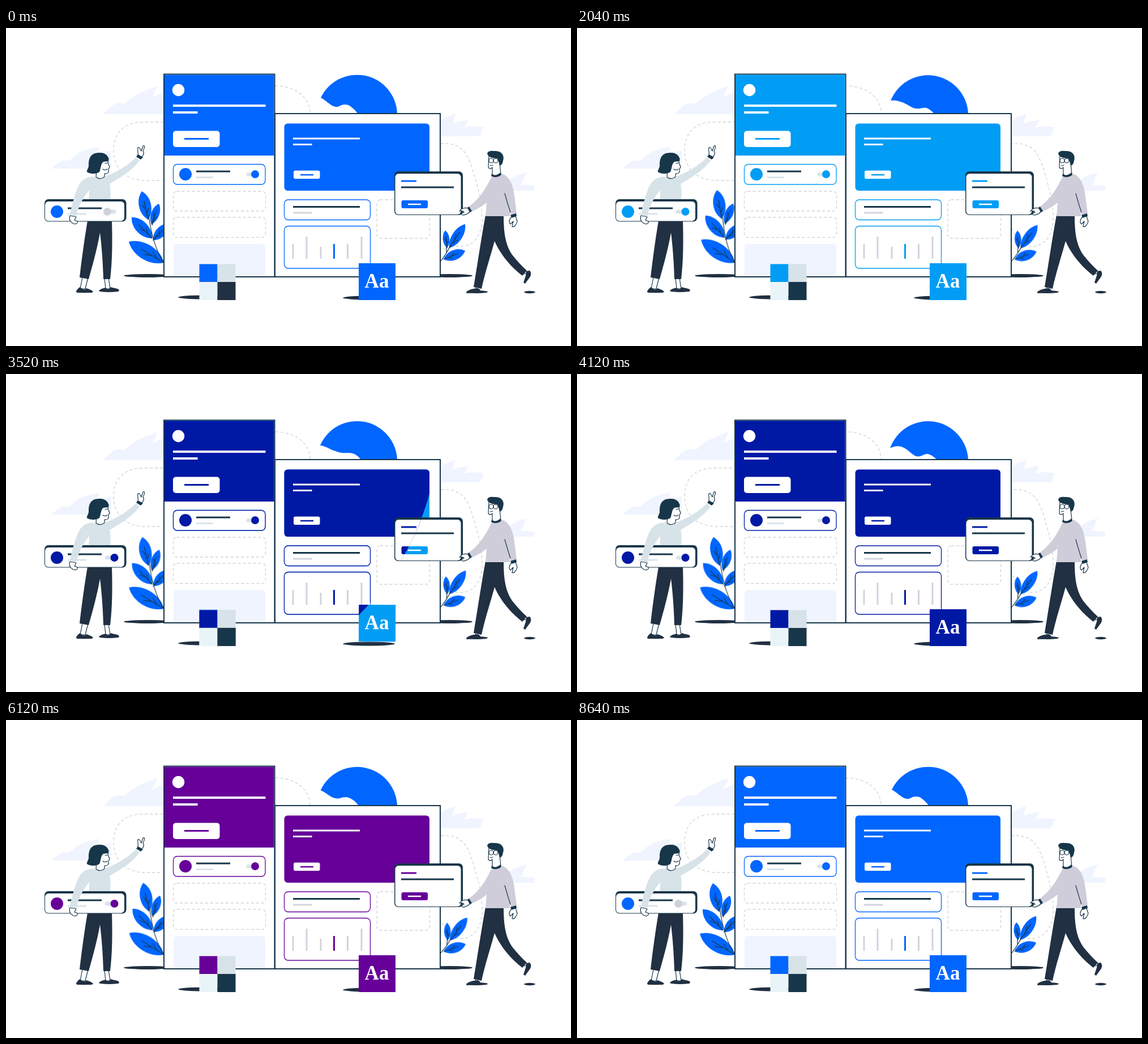
Animation of 998 by 561 pixels, one loop 8.68 s. Source, as an HTML page:

```html
<!DOCTYPE html>
<html lang="en">
<head>
<meta charset="utf-8">
<title>Interface themes</title>
<style>
html, body { margin: 0; width: 100%; height: 100%; overflow: hidden; background: #fff; }
svg { display: block; width: 100vw; height: 100vh; }
.ink { fill: #17364a; }
.slate { fill: #213042; }
.cloud, .panel { fill: #f0f4ff; }
.line { fill: none; stroke: #17364a; stroke-width: 1.2; stroke-linecap: round; stroke-linejoin: round; }
.skin { fill: #fff; stroke: #17364a; stroke-width: 1.2; stroke-linejoin: round; }
.box { fill: #fff; stroke: #17364a; stroke-width: 2; }
.dash { fill: none; stroke: #d2d2da; stroke-width: 1.3; stroke-dasharray: 5 4; }
.trail { stroke: #ccd6d4; animation: march 8.68s linear infinite; }
.blue { fill: #06f; }
.tint { fill: currentColor; }
.edge { fill: #fff; stroke: currentColor; stroke-width: 1.3; }
.plant { animation: 8.68s ease-in-out infinite; }
.left { transform-origin: 279px 414px; animation-name: swayLeft; }
.right { transform-origin: 768px 411px; animation-name: swayRight; }
.sun { animation: swell 2893.33ms ease-in-out infinite; }
.avatar { animation: recolor 8.68s linear infinite; }
.knob { animation: slide 8.68s ease-in-out infinite, light 8.68s linear infinite; }
.dots { opacity: 0; animation: pop 8.68s linear infinite; }
.palette { transform-origin: 405px 480px; animation: hopPalette 8.68s ease-in-out infinite; }
.type { transform-origin: 688px 480px; animation: hopType 8.68s ease-in-out infinite; }
.aa { font: bold 35px "Liberation Serif", "Noto Serif", serif; fill: #fff; text-anchor: middle; }
@keyframes march { to { stroke-dashoffset: -180px; } }
@keyframes swayLeft {
  0%, 100% { transform: rotate(0); }
  17.5%, 57.6% { transform: rotate(4.3deg); }
  35% { transform: rotate(.3deg); }
  47.5% { transform: rotate(.5deg); }
  70.5% { transform: rotate(1.1deg); }
  84.8% { transform: rotate(.9deg); }
}
@keyframes swayRight {
  0%, 100% { transform: rotate(0); }
  17.5% { transform: rotate(2.6deg); }
  35%, 84.8% { transform: rotate(.4deg); }
  47.5% { transform: rotate(2deg); }
  70.5% { transform: rotate(3.3deg); }
}
@keyframes swell {
  0%, 100% { d: path("M556 123C565 127 572 137 582 139C589 140 591 135 598 135C606 135 608 138 612 141C616 144 619 148 621 151L691 151A71 71 0 0 0 556 123Z"); }
  50% { d: path("M553 131C562 127 568 125 578 130C590 137 594 146 603 146C610 146 612 141 620 141C628 143 633 148 636 151L691 151A71 71 0 0 0 553 131Z"); }
}
@keyframes slide {
  0%, 6.4%, 84%, 100% { transform: translateX(-12.5px); }
  9.7%, 81% { transform: none; }
}
</style>
</head>
<body>
<svg viewBox="0 0 998 561">
  <defs id="clips"></defs>

  <path class="cloud" d="M171 152C181 145 186 135 196 133C205 131 208 137 213 131C225 118 242 112 267 102C264 111 262 118 256 123C265 119 270 117 278 113V152Z"/>
  <path class="cloud" d="M80 248C90 241 95 233 104 234C113 236 117 229 126 222C138 214 152 212 166 210L158 222L185 216V248Z"/>
  <path class="cloud" d="M767 164C776 158 784 154 794 152C791 158 791 163 789 169C797 165 806 163 817 163C813 167 812 172 809 176C820 172 832 173 844 175C840 180 841 187 836 191H767Z"/>
  <path class="cloud" d="M870 287C885 268 898 259 921 255C914 262 916 268 909 277C917 276 926 278 934 279L932 287Z"/>

  <path class="dash trail" d="M278 166H242C206 166 190 187 190 216C190 250 214 269 246 269H278"/>
  <path class="dash trail" d="M475 102C514 102 537 125 537 150"/>
  <path class="dash trail" d="M767 204C808 201 816 224 826 255C834 284 841 305 841 335C841 372 820 389 796 385C780 382 774 363 767 352"/>

  <path class="sun blue" d="M556 123C565 127 572 137 582 139C589 140 591 135 598 135C606 135 608 138 612 141C616 144 619 148 621 151L691 151A71 71 0 0 0 556 123Z"/>

  <g class="slate">
    <ellipse cx="250" cy="437" rx="42" ry="3"/>
    <ellipse cx="784" cy="437" rx="40" ry="3"/>
    <ellipse cx="350" cy="475" rx="46" ry="3.5"/>
    <ellipse cx="641" cy="476" rx="46" ry="3.5"/>
    <ellipse cx="925" cy="466" rx="10" ry="2.2"/>
    <ellipse cx="832" cy="465.5" rx="19" ry="2.5"/>
    <ellipse cx="139" cy="465" rx="15" ry="2.2"/>
    <ellipse cx="182" cy="463.5" rx="18" ry="2.5"/>
  </g>

  <g class="plant left" id="plantLeft"></g>
  <g class="plant right" id="plantRight"></g>

  <rect class="box" x="475" y="151" width="292" height="288"/>
  <rect class="box" x="279" y="81.5" width="195.5" height="357.5"/>
  <rect class="dash" x="295.5" y="288" width="163" height="35" rx="6"/>
  <rect class="dash" x="295.5" y="334" width="163" height="35.5" rx="6"/>
  <rect class="dash" x="655" y="303" width="93.5" height="68" rx="6"/>
  <path class="panel" d="M296 438V387Q296 381 302 381H452Q458 381 458 387V438Z"/>

  <!-- woman, behind her card -->
  <path class="skin" d="M135 440L131 460H140L145 440M174 441L176 460H184L181 441"/>
  <path class="slate" d="M144 340H187C188 375 188 410 184 443H172C171 412 169 385 166 361C161 390 153 418 146 443L130 440C134 405 139 370 144 340Z"/>
  <path class="slate" d="M124 465C125 461 129 458 131 457C135 462 140 462 142 459C147 461 152 462 153 465C153 467 151 467 149 467H127C125 467 124 466 124 465ZM165 463C167 460 173 459 176 458C179 462 183 461 185 457C190 459 195 459 199 461C200 463 199 465 195 465H168Z"/>
  <path fill="#d7e3e8" d="M157 263C164 267 171 266 174 262C196 255 214 243 230 228L236 234C222 252 205 262 183 275C186 287 184 297 184 310H146L147 286L136 268C144 263 150 261 157 263Z"/>
  <path class="skin" d="M160 248L159 263C164 267 171 266 174 262V257C180 258 182 254 181 249L183 245L180 238L181 230H163Z"/>
  <path class="ink" d="M146 244C145 228 151 220 164 220C176 219 183 227 181 235L172 236C167 240 168 247 165 254C159 258 149 258 143 254C142 252 145 248 146 244Z"/>
  <path class="line" d="M171 249Q175 252 179 249M175 239L179 238"/>
  <path class="skin" d="M233 226C234 221 232 214 233 211C236 209 237 214 239 217L242 208C246 206 245 211 242 217C245 221 242 226 239 228Z"/>
  <path class="ink" d="M230 227L233 223L242 228L238 232Z"/>

  <!-- man, behind his card -->
  <path class="skin" d="M859 246V260C866 264 872 262 874 258L872 238L867 226H853L852 244C852 249 856 249 859 246Z"/>
  <path class="slate" d="M847 330H879C879 362 882 382 894 400C902 410 911 420 920 428L912 437C892 422 873 399 863 376C855 405 846 432 840 460L826 457C832 422 839 374 847 330Z"/>
  <path class="slate" d="M813 468C814 462 823 460 833 459C839 461 839 465 837 467ZM919 429L925 428C929 432 927 437 925 440L917 451L914 449L918 437Z"/>
  <path class="line" d="M915 434L920 432M830 458L829 461"/>
  <path class="skin" d="M893 333C888 338 888 344 891 346L896 341L894 350C897 353 902 346 903 341L900 332Z"/>
  <path fill="#cfcdd9" d="M859 260C866 264 874 262 876 257C891 262 896 280 898 296L902 327L892 331L890 321V332H847L849 308C840 315 832 320 820 325L815 317C838 301 848 282 859 260Z"/>
  <path class="line" d="M881 292Q886 310 891 325"/>
  <path class="ink" d="M858 257C862 261 868 260 873 255L875 259C869 264 862 264 857 261ZM891 330L901 327L902 332L893 335Z"/>
  <path class="ink" d="M850 221C853 215 860 217 865 217C876 217 881 226 878 234C877 240 875 242 872 243L869 230C862 230 851 229 850 221Z"/>
  <g class="line"><circle cx="857" cy="234" r="4"/><circle cx="865" cy="234" r="4"/><path d="M869 233L873 232M855 243L860 242"/></g>

  <g class="dots ink">
    <circle cx="171" cy="205" r="1"/><circle cx="179" cy="205" r="1"/><circle cx="184" cy="211" r="1"/>
    <circle cx="858" cy="202" r="1"/><circle cx="866" cy="200.5" r="1"/><circle cx="873" cy="206" r="1"/>
  </g>

  <!-- her card -->
  <rect class="ink" x="68" y="302" width="144.5" height="39.5" rx="7"/>
  <rect x="69" y="306" width="140" height="34.5" rx="6" fill="#fff"/>
  <circle class="avatar" cx="90" cy="324" r="11"/>
  <path d="M109 318H169" stroke="#17364a" stroke-width="3"/>
  <path d="M109 328H142" stroke="#d9e4ea" stroke-width="3"/>
  <path d="M178 324H191" stroke="#d9e4ea" stroke-width="7" stroke-linecap="round"/>
  <circle class="knob" cx="191.5" cy="324" r="7"/>

  <g id="layers"></g>

  <g class="type"><text class="aa" x="655" y="458">Aa</text></g>

  <!-- hands in front of the cards -->
  <path class="skin" d="M113 331C111 337 113 342 119 345C124 347 127 344 126 341L121 339L124 333Z"/>
  <path fill="#d7e3e8" d="M137 268C127 273 120 298 113 328L124 333C127 317 134 302 147 286L148 272Z"/>
  <path class="skin" d="M816 318C810 316 804 319 801 323C805 322 808 323 809 325L804 328C806 332 815 329 820 324Z"/>
  <path class="ink" d="M815 317L818 315L823 323L819 325Z"/>
</svg>
<script>
const loop = 8680;
const waves = [1220, 3033, 4980, 6840];
const colors = ['#06f', '#019df4', '#0019a5', '#609', '#06f'];
const ink = '#17364a', pale = '#d9e4ea', grey = '#d3d3dd';
const byId = id => document.getElementById(id);
const pct = ms => (ms / loop * 100).toFixed(2) + '%';
const at = delay => waves.map(w => pct(w + delay)).join(',');

// Keyframes that repeat around each theme change
const hop = (name, lift, peak, land) => `@keyframes ${name} {
  0%, 100%, ${at(100)}, ${at(land)} { transform: none; }
  ${at(300)} { transform: rotate(5deg); }
  ${at(peak)} { transform: translateY(-${lift}px); } }`;

// Each layer opens as a circle and goes once the next one covers it
const grow = (color, i) => {
  const open = i ? `0%, ${pct(waves[i - 1])} { r: 0px; } ${pct(waves[i - 1] + 640)}` : '0%';
  const close = i < waves.length
    ? `, ${pct(waves[i] + 640)} { r: 640px; } ${pct(waves[i] + 650)}, 100% { r: 0px; }`
    : ', 100% { r: 640px; }';
  return `@keyframes grow${i} { ${open}${close} }`;
};

// Fill that switches theme at a delay after each wave starts
const switches = (list, delay) => list.map((w, i) =>
  `${pct(w + delay)} { fill: ${colors[i]}; } ${pct(w + delay + 40)} { fill: ${colors[i + 1]}; }`).join('');

const style = document.createElement('style');
style.textContent = hop('hopPalette', 8, 400, 500) + hop('hopType', 8, 520, 680) +
  `@keyframes pop { 0%, 100%, ${at(-410)}, ${at(290)} { opacity: 0; transform: translateY(3px); }
    ${at(-200)}, ${at(60)} { opacity: 1; transform: none; } }
  @keyframes recolor { 0%, 100% { fill: ${colors[0]}; } ${switches(waves, 250)} }
  @keyframes light { 0%, ${pct(560)}, ${pct(7400)}, 100% { fill: #d0d0d8; }
    ${pct(840)} { fill: ${colors[0]}; } ${switches(waves.slice(0, 3), 230)} ${pct(7060)} { fill: ${colors[3]}; } }` +
  colors.map(grow).join('');
document.head.append(style);

const rect = (x, y, w, h, rx, cls) =>
  `<rect x="${x}" y="${y}" width="${w}" height="${h}" rx="${rx}" class="${cls}"/>`;
const block = (x, y, w, h, rx, color = '#fff') =>
  `<rect x="${x}" y="${y}" width="${w}" height="${h}" rx="${rx}" fill="${color}"/>`;
const bar = (x1, x2, y, w, color = 'currentColor') =>
  `<path d="M${x1} ${y}H${x2}" stroke="${color}" stroke-width="${w}"/>`;
const dot = (x, y, r) => `<circle cx="${x}" cy="${y}" r="${r}" class="tint"/>`;

const chart = [[507, 381], [531, 368], [556, 386], [579.5, 381], [603.5, 381], [628, 368]]
  .map(([x, y], i) => `<path d="M${x} ${y}V407" stroke-width="3" stroke="${i == 3 ? 'currentColor' : grey}"/>`)
  .join('');

const art = i => [
  // phone
  rect(280, 82.5, 193.5, 142.5, 0, 'tint'),
  '<circle cx="304.5" cy="109.5" r="10.7" fill="#fff"/>',
  bar(295, 458.5, 137, 4, '#fff'), bar(295, 338.5, 149, 4, '#fff'),
  block(295, 181.5, 82.5, 28.5, 5), bar(315, 358, 195.5, 3),
  rect(295.5, 240.5, 162.5, 35.5, 7, 'edge'), dot(317, 258, 11),
  bar(336, 396, 253, 3, ink), bar(336, 366, 263.5, 3, pale),
  block(424.5, 255, 16, 6.5, 3, pale), dot(440, 258, 7),
  // web page
  rect(491.5, 168.5, 256.5, 118.5, 6, 'tint'),
  bar(507, 625, 195, 3, '#fff'), bar(507, 540.5, 205.5, 3, '#fff'),
  block(508, 251.5, 46.5, 14.5, 3), bar(520, 543, 259, 2.5),
  rect(491.5, 303, 152, 35.5, 7, 'edge'),
  bar(507, 625, 315.5, 3, ink), bar(507, 540.5, 326, 3, grey),
  rect(491.5, 349.5, 152, 74.5, 7, 'edge'), chart,
  // his card
  rect(686, 253, 121, 77, 7, 'ink'), block(687.5, 257, 116, 72, 6),
  bar(698, 725, 270, 3), bar(698, 791, 281, 3, ink),
  rect(698.5, 304, 46.5, 14, 3, 'tint'), bar(710, 733, 311, 2.5, '#fff'),
  // cubes
  `<g class="palette">
    ${rect(341.5, 416.5, 32, 32, 0, 'tint')}${block(373.5, 416.5, 32, 32, 0, '#d7e3e8')}
    ${block(341.5, 448, 32, 32, 0, '#e9f4f8')}${block(373.5, 448, 32, 32, 0, i ? ink : '#213042')}
  </g>`,
  `<g class="type">${rect(623, 415, 65, 65, 0, 'tint')}</g>`
].join('');

byId('clips').innerHTML = colors.map((c, i) => `<clipPath id="wave${i}">
  <circle cx="278" cy="81" r="0" style="animation:grow${i} ${loop}ms linear infinite"/></clipPath>`).join('');
byId('layers').innerHTML = colors.map((c, i) =>
  `<g color="${c}" clip-path="url(#wave${i})">${art(i)}</g>`).join('');

// Leaf from base to tip with a half width and veins
function leaf([bx, by, tx, ty, w]) {
  const dx = tx - bx, dy = ty - by, len = Math.hypot(dx, dy);
  const p = (along, side) =>
    `${(bx + dx * along - dy / len * side * w).toFixed(1)} ${(by + dy * along + dx / len * side * w).toFixed(1)}`;
  return `<path class="blue" d="M${p(0, 0)}C${p(.25, 1.3)} ${p(.75, 1.3)} ${p(1, 0)}C${p(.75, -1.3)} ${p(.25, -1.3)} ${p(0, 0)}Z"/>
    <path class="line" d="M${p(0, 0)}L${p(.65, 0)}M${p(.2, 0)}L${p(.38, .45)}M${p(.35, 0)}L${p(.53, -.45)}"/>`;
}
const plant = (stem, leaves) => leaves.map(leaf).join('') + `<path class="line" d="${stem}"/>`;

byId('plantLeft').innerHTML = plant('M279 414C264 392 256 362 252 330M258 348L262 338M260 374L268 364', [
  [251, 338, 240, 288, 11], [257, 346, 270, 310, 7.5], [258, 371, 222, 334, 11],
  [260, 374, 288, 345, 9], [279, 414, 217, 377, 14]
]);
byId('plantRight').innerHTML = plant('M768 411C775 402 781 393 785 383M778 396L778 386', [
  [779, 388, 776, 357, 6], [783, 388, 811, 346, 9], [773, 408, 811, 393, 9]
]);
</script>
</body>
</html>
```
